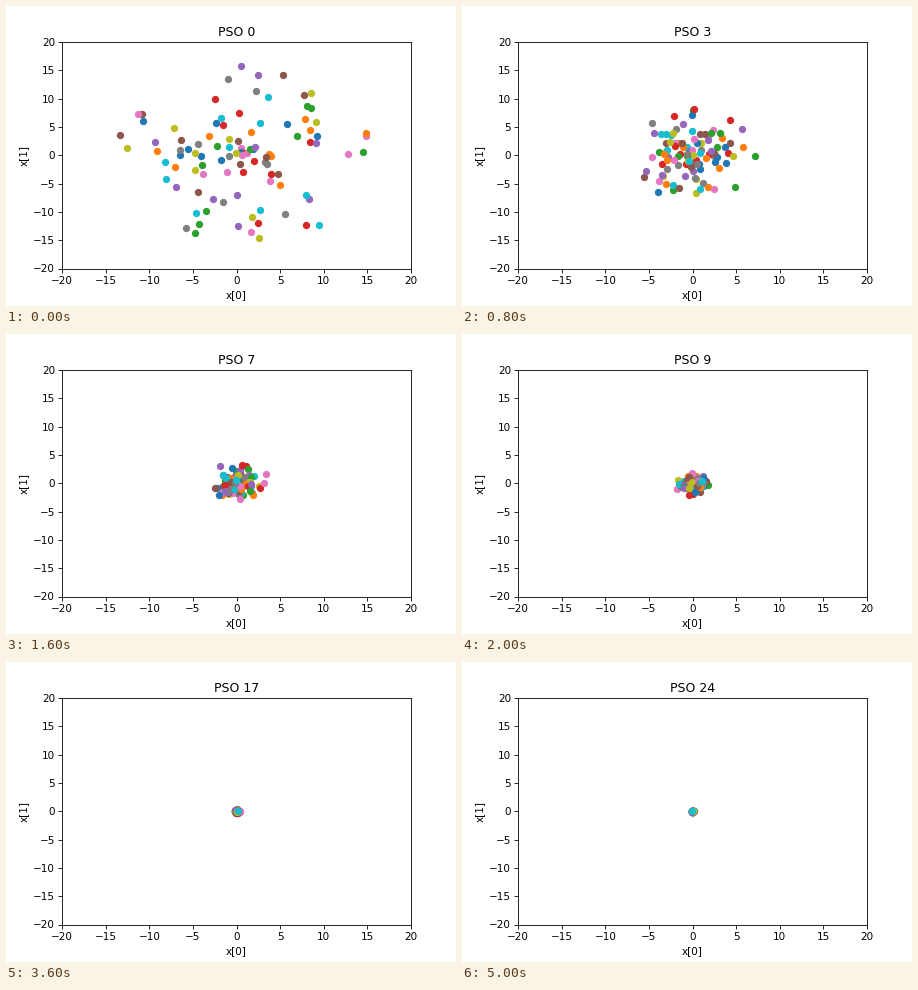
A matplotlib script for the animation above (5.2 s loop, 450x300 px).

```python
import numpy as np
import matplotlib.pyplot as plt
from matplotlib.animation import FuncAnimation

COUNT = 100
STEPS = 25

rng = np.random.default_rng(12)


def disc():
    """Points in the unit disc, denser towards the centre."""
    radius = rng.permutation(np.linspace(.03, 1.04, COUNT))
    angle = rng.uniform(0, 2 * np.pi, COUNT)
    return np.column_stack([radius * np.cos(angle), radius * np.sin(angle)])


start, push = disc(), disc()
rate = rng.uniform(1.2, 2.6, (COUNT, 2))


def swarm(step):
    """Damped swing of every particle about the optimum."""
    reach = 15 * .78 ** step + .08
    turn = rate * step
    return reach * (start * np.cos(turn) + push * np.sin(turn))


fig, ax = plt.subplots(figsize=(6, 4), dpi=75)
fig.subplots_adjust(left=.125, right=.9, bottom=.125, top=.88)
ax.set(xlim=(-20, 20), ylim=(-20, 20), xlabel="x[0]", ylabel="x[1]")
ticks = np.arange(-20, 21, 5)
ax.set_xticks(ticks)
ax.set_yticks(ticks)
dots = [ax.plot([], [], "o")[0] for _ in range(COUNT)]


def draw(frame):
    step = max(0, frame - 1)  # the first step is held twice as long
    for dot, (x, y) in zip(dots, swarm(step)):
        dot.set_data([x], [y])
    ax.set_title(f"PSO {step}")
    return dots


anim = FuncAnimation(fig, draw, frames=STEPS + 1, interval=200,
                     repeat=True, repeat_delay=0)
plt.show()
```
